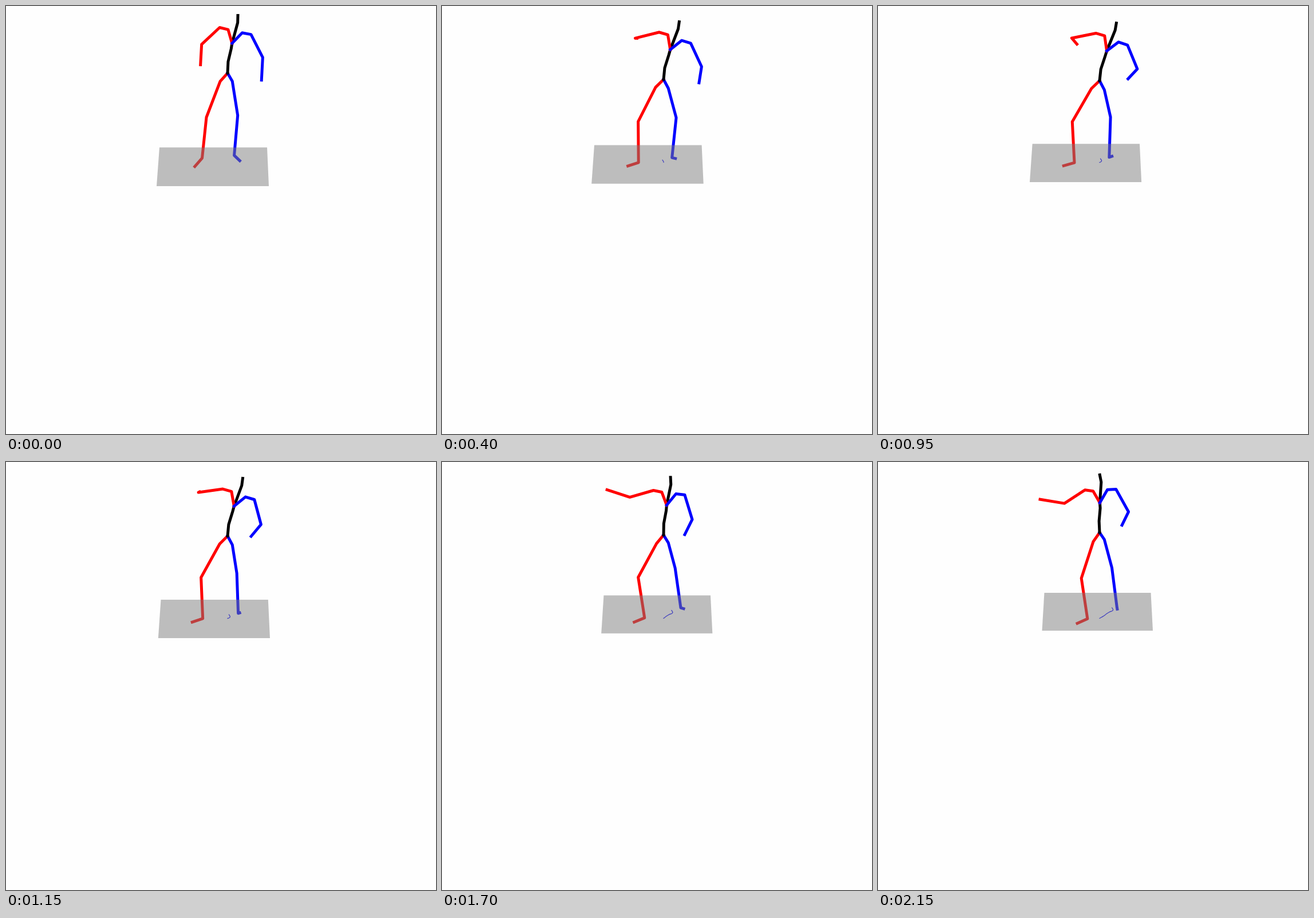
Write an HTML page with a canvas that moves like this. It is 751x746 px and loops after 2.2 s.

```html
<!DOCTYPE html>
<html lang="en">
<head>
<meta charset="utf-8">
<title>Walking figure</title>
<style>
html, body { margin: 0; width: 100%; height: 100%; overflow: hidden; background: #fefefe; }
canvas { display: block; }
</style>
</head>
<body>
<canvas id="stage" width="751" height="746"></canvas>
<script>
const ctx = document.getElementById("stage").getContext("2d");
const LOOP = 2.2, STEP = 0.05;
const RED = "#f00", BLUE = "#00f", BLACK = "#000";

// Smooth curve through [seconds, value] keys.
function track(...keys) {
  const rate = i => (keys[i + 1][1] - keys[i][1]) / (keys[i + 1][0] - keys[i][0]);
  const last = keys.length - 1;
  const slopes = keys.map(([t], i) => {
    if (i === 0) return rate(0);
    if (i === last) return rate(last - 1);
    const before = t - keys[i - 1][0], after = keys[i + 1][0] - t;
    return (rate(i - 1) * after + rate(i) * before) / (before + after);
  });
  return t => {
    let i = 0;
    while (i < last - 1 && t >= keys[i + 1][0]) i++;
    const [t0, v0] = keys[i], [t1, v1] = keys[i + 1];
    const h = t1 - t0, u = Math.min(1, (t - t0) / h), w = 1 - u;
    return v0 * (1 + 2 * u) * w * w + v1 * u * u * (3 - 2 * u)
      + h * u * w * (slopes[i] * w - slopes[i + 1] * u);
  };
}

// Forward lean drives the spine, shoulders and hips.
const lean = t => 5.7 + 7.3 * Math.cos(1.7 * (t - 0.75));
const hipY = track([0, 117], [0.4, 128], [0.75, 131], [1.15, 129], [1.5, 128.5], [2.15, 123]);

const floorX = track([0, 268], [0.4, 266], [0.75, 269.5], [1.15, 270.5], [1.5, 278.5], [2.15, 290.5]);
const floorY = track([0, 246.5], [0.75, 240], [1.15, 240], [1.7, 232.5], [2.15, 228]);

// Bones swing by angle in degrees; foreshortened ones also change length or reach.
const right = {
  upperArm: track([0, 137], [0.4, 166], [0.75, 165], [1.15, 172], [1.7, 164], [2.15, 147]),
  handX: track([0, -2], [0.4, 3], [0.75, 10], [1.15, 2], [1.5, -31.5], [2.15, -42.5]),
  handY: track([0, 35.5], [0.4, 0], [0.75, 19], [1.15, -1], [1.5, -3.5], [1.7, -13], [2.15, -7]),
  thigh: track([0, 111], [0.4, 117], [0.75, 120.5], [1.15, 119], [1.7, 118.5], [2.15, 108]),
  shin: track([0, 96], [0.75, 86], [1.15, 87.6], [1.5, 82.2], [2.15, 81.4]),
  foot: track([0, 131], [0.4, 162], [0.75, 166], [1.15, 161], [2.15, 156])
};
const left = {
  upperArm: track([0, 63], [0.4, 65], [0.75, 61], [1.15, 75], [1.5, 76], [2.15, 61]),
  forearm: track([0, 93], [0.4, 99], [0.75, 130], [1.15, 130], [1.5, 119], [2.15, 116]),
  forearmLength: track([0, 39.5], [0.75, 22.5], [1.4, 30], [2.15, 26]),
  thigh: track([0, 81], [0.4, 75], [0.75, 73], [1.15, 81], [1.5, 76], [2.15, 75]),
  thighLength: track([0, 60], [0.4, 53], [0.75, 48], [1.15, 50], [1.7, 45.5], [2.15, 51]),
  shin: track([0, 95], [0.4, 96], [0.75, 94.5], [1.5, 82.6], [2.15, 82.7]),
  toeX: track([0, 9.7], [0.4, 6], [0.75, 7], [1.15, 2.5], [1.7, 5], [2.15, 0.5]),
  toeY: track([0, 9.3], [0.4, 1.5], [0.75, -1.5], [1.5, 1], [2.15, 2.5])
};

const shift = ([x, y], dx, dy) => [x + dx, y + dy];

function bone(from, length, degrees) {
  const a = degrees * Math.PI / 180;
  return shift(from, length * Math.cos(a), length * Math.sin(a));
}

function trace(points) {
  ctx.beginPath();
  points.forEach(([x, y]) => ctx.lineTo(x, y));
}

function stroke(color, width, points) {
  trace(points);
  ctx.strokeStyle = color;
  ctx.lineWidth = width;
  ctx.stroke();
}

function drawBody(t) {
  const n = lean(t);
  const limb = (color, ...points) => stroke(color, 5, points);
  const hip = [387, hipY(t)];
  const neck = shift(hip, n, -52);
  const head = shift(hip, 2 + 2 * n, -88);

  const hipR = shift(hip, -11 - 0.25 * n, 16 - 0.2 * n);
  const kneeR = bone(hipR, 67, right.thigh(t));
  const ankleR = bone(kneeR, 71.5, right.shin(t));
  limb(RED, hip, hipR, kneeR, ankleR, bone(ankleR, 19.5, right.foot(t)));

  const hipL = shift(hip, 8.3, 12 + 0.3 * n);
  const kneeL = bone(hipL, left.thighLength(t), left.thigh(t));
  const ankleL = bone(kneeL, 70, left.shin(t));
  limb(BLUE, hip, hipL, kneeL, ankleL, shift(ankleL, left.toeX(t), left.toeY(t)));

  limb(BLACK, hip, shift(hip, 0.25 * n - 1, -20), shift(hip, 0.7 * n + 0.8, -42.5),
    neck, head, shift(head, 0.38 * (n - 7), -12.5));

  const shoulderR = shift(neck, 0.55 * n - 26, -22 - 0.7 * n);
  const elbowR = bone(shoulderR, 43, right.upperArm(t));
  limb(RED, neck, shift(neck, 0.65 * n - 12, -20 - 0.5 * n), shoulderR, elbowR,
    shift(elbowR, right.handX(t), right.handY(t)));

  const shoulderL = shift(neck, 28 + 0.65 * n, 1.1 * n - 24);
  const elbowL = bone(shoulderL, 45, left.upperArm(t));
  limb(BLUE, neck, shift(neck, 13 + 0.6 * n, 0.6 * n - 23), shoulderL, elbowL,
    bone(elbowL, left.forearmLength(t), left.forearm(t)));
}

// Past ground positions of the hip, carried along with the floor.
function drawTrail(t, x, y) {
  const points = [];
  for (let i = 0; i * STEP <= t; i++) {
    const s = i * STEP;
    points.push([387 + (x - floorX(s)) * 0.96, 272.5 + y - floorY(s)]);
  }
  if (points.length > 1) stroke(BLUE, 1.25, points);
}

function drawFloor(x, y) {
  const far = (246.5 - y) / 18.5;
  const edge = x + 188 - 2 * far, bottom = y + 67.5 - 1.5 * far;
  trace([[x, y], [edge, y], [edge + 3 + 0.5 * far, bottom], [x - 5 + far, bottom]]);
  ctx.fillStyle = "rgba(127,127,127,0.5)";
  ctx.fill();
}

function draw(t) {
  const x = floorX(t), y = floorY(t);
  ctx.fillStyle = "#fefefe";
  ctx.fillRect(0, 0, 751, 746);
  ctx.lineJoin = "round";
  ctx.lineCap = "square";
  drawTrail(t, x, y);
  drawBody(t);
  drawFloor(x, y);
}

const start = performance.now();
function tick() {
  const t = (performance.now() - start) / 1000 % LOOP;
  draw(Math.floor(t / STEP) * STEP);
  requestAnimationFrame(tick);
}
tick();
</script>
</body>
</html>
```
